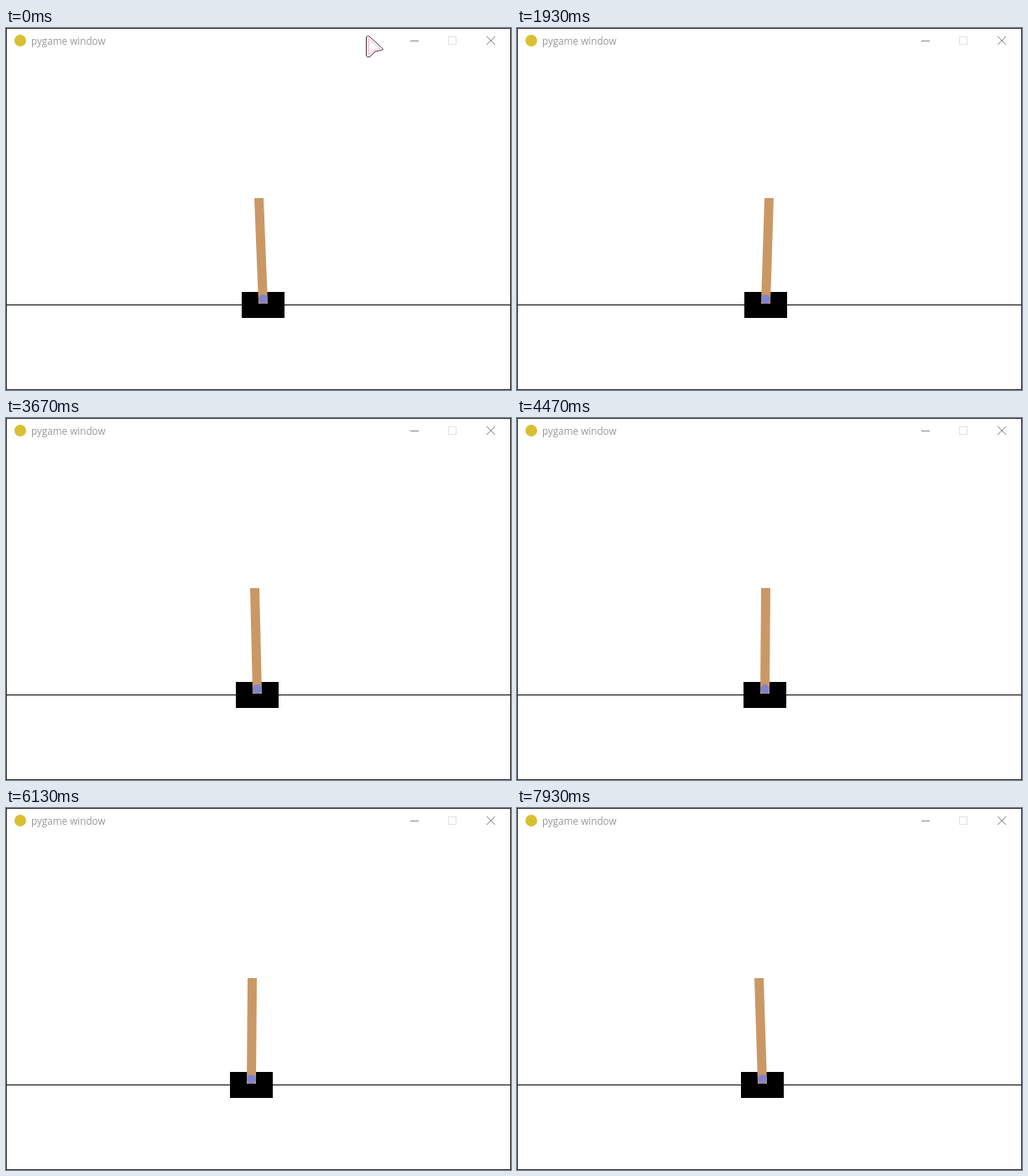
Animation, 602 px wide and 432 px high, one loop 8000 ms. Source, as an HTML page with a canvas:

```html
<!DOCTYPE html>
<html lang="en">
<head>
<meta charset="utf-8">
<title>pygame window</title>
<style>
  html, body { margin: 0; width: 100%; height: 100%; overflow: hidden; background: #fff; }
  canvas { display: block; }
</style>
</head>
<body>
<canvas id="stage" width="602" height="432"></canvas>
<script>
const ctx = document.getElementById('stage').getContext('2d');
const LOOP = 8000, TICK = 1000 / 15, TICKS = 120;

// Turning points as [tick, x]
const CART = [
  [0, 281], [14.5, 273], [20, 278], [30, 271], [38.5, 280], [49, 269],
  [56, 274], [64, 268], [72, 273], [79, 266.6], [87, 272], [94, 265],
  [101, 270], [110, 263], [115, 268], [119, 267]
];
const POLE_TOP = [[0, 296], [16, 297], [55, 291], [80, 290], [119, 283]];

const linear = p => p;
// Slows down a little at each turn
const swing = p => (p + (1 - Math.cos(Math.PI * p)) / 2) / 2;

function along(points, n, ease) {
  const i = Math.max(1, points.findIndex(p => p[0] >= n));
  const [t0, a] = points[i - 1], [t1, b] = points[i];
  return Math.round(a + (b - a) * ease((n - t0) / (t1 - t0)));
}

function rect(color, x, y, w, h) {
  ctx.fillStyle = color;
  ctx.fillRect(x, y, w, h);
}

function frame(color, x, y, w, h) {
  ctx.strokeStyle = color;
  ctx.lineWidth = 1;
  ctx.strokeRect(x + 0.5, y + 0.5, w - 1, h - 1);
}

function disc(color, x, y, r) {
  ctx.fillStyle = color;
  ctx.beginPath();
  ctx.arc(x, y, r, 0, Math.PI * 2);
  ctx.fill();
}

function drawWindow() {
  rect('#fff', 0, 0, 602, 432);
  frame('#2d2d2d', 0, 0, 602, 432);
  disc('#d9c032', 17, 15, 7);
  ctx.fillStyle = '#999';
  ctx.font = '11.7px "Open Sans", "Noto Sans", sans-serif';
  ctx.fillText('pygame window', 30, 20);
  rect('#888', 482, 15, 10, 1);
  frame('#e2e2e2', 527, 10, 10, 10);
  ctx.strokeStyle = '#888';
  ctx.stroke(new Path2D('M573 10l10 10m0 -10l-10 10'));
}

function drawCart(x, top) {
  const base = x + 20;
  rect('#000', 1, 330, 600, 1);
  rect('#000', x, 315, 51, 31);
  ctx.fillStyle = '#ca9865';
  ctx.fill(new Path2D(`M${top} 203h11L${base + 11} 329h-11Z`));
  disc('#8184cb', base + 5.5, 323.5, 5.5);
}

const arrow = new Path2D('M429.5 12Q429.5 8.5 433 10L448.5 24Q450.5 26 447.5 26.5L440 28L434 34Q429.5 36 429.5 32Z');
const arrowInner = new Path2D('M432.5 13L445.5 24.5L439 26L432.5 31.5Z');

// Leaves through the top right corner
function drawPointer(n) {
  ctx.save();
  ctx.translate(30 * n, -1.7 * n);
  ctx.lineWidth = 1;
  ctx.fillStyle = '#fff';
  ctx.fill(arrow);
  ctx.strokeStyle = '#4a2f3c';
  ctx.stroke(arrow);
  ctx.strokeStyle = '#f3b4cf';
  ctx.stroke(arrowInner);
  ctx.restore();
}

const start = performance.now();

function draw() {
  const t = (performance.now() - start) % LOOP;
  const n = Math.floor((t + 3.5) / TICK) % TICKS;
  drawWindow();
  drawCart(along(CART, n, swing), along(POLE_TOP, n, linear));
  drawPointer(n);
  requestAnimationFrame(draw);
}
draw();
</script>
</body>
</html>
```
